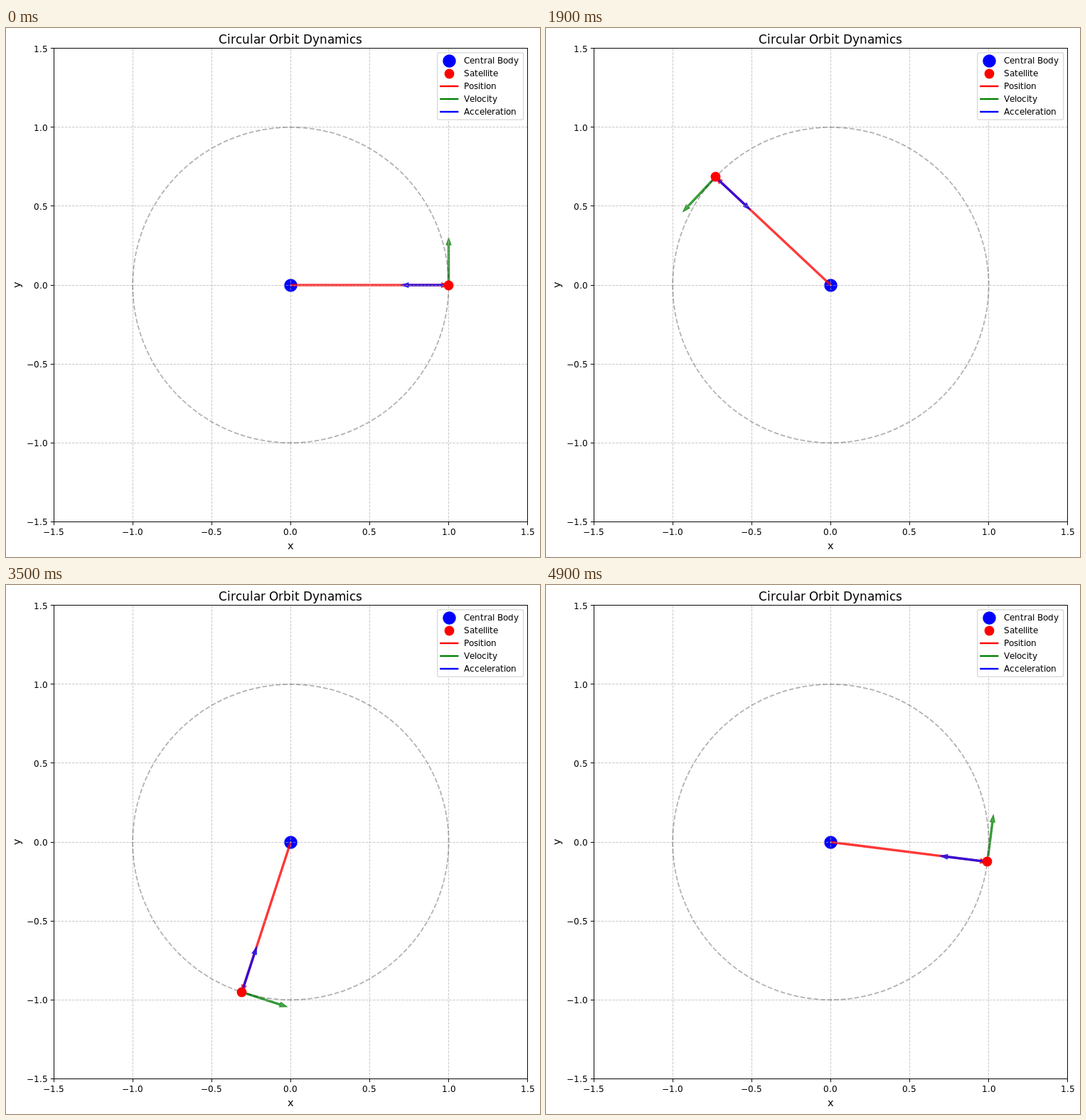
Write an HTML page with a canvas that moves like this. It is 751 px wide and 745 px high and loops after 5 s.

```html
<!DOCTYPE html>
<html lang="en">
<head>
<meta charset="utf-8">
<title>Circular Orbit Dynamics</title>
<style>
html, body { margin: 0; width: 100%; height: 100%; overflow: hidden; background: #fff; }
canvas { display: block; }
</style>
</head>
<body>
<canvas id="plot" width="751" height="745"></canvas>
<script>
const ctx = document.getElementById('plot').getContext('2d');
const PT = 1.2024;              // pixels per point
const CX = 400.35, CY = 362.05; // plot centre
const UNIT = 222.2;             // pixels per data unit
const STEPS = 50, STEP_MS = 100;
const TICKS = [-1.5, -1, -0.5, 0, 0.5, 1, 1.5];

const px = x => CX + x * UNIT;
const py = y => CY - y * UNIT;
const snap = v => Math.floor(v) + 0.5;
const L = snap(px(-1.5)), R = snap(px(1.5));
const T = snap(py(1.5)), B = snap(py(-1.5));

function line(x1, y1, x2, y2) {
  ctx.beginPath();
  ctx.moveTo(x1, y1);
  ctx.lineTo(x2, y2);
  ctx.stroke();
}

function pen(color, points, dashed = false) {
  const w = points * PT;
  ctx.strokeStyle = color;
  ctx.lineWidth = w;
  ctx.setLineDash(dashed ? [3.7 * w, 1.6 * w] : []);
}

// Markers sit on pixel centres
function dot(x, y, r, color) {
  ctx.fillStyle = color;
  ctx.beginPath();
  ctx.arc(snap(x), snap(y), r, 0, 2 * Math.PI);
  ctx.fill();
}

// Text on whole pixels, each glyph advancing by its rounded width.
// anchor: 0 left, 0.5 centre, 1 right
function text(str, x, y, points = 10, anchor = 0.5) {
  ctx.font = `${points * PT}px "DejaVu Sans", sans-serif`;
  ctx.fillStyle = '#000';
  const widths = [...str].map(ch => Math.round(ctx.measureText(ch).width));
  const total = widths.reduce((sum, w) => sum + w, 0);
  let left = Math.round(x - total * anchor);
  [...str].forEach((ch, i) => {
    ctx.fillText(ch, left, Math.round(y));
    left += widths[i];
  });
}

// Arrow from (x, y) along (dx, dy) in data units, head included in its length
function arrow(x, y, dx, dy, color) {
  const len = Math.hypot(dx, dy) * UNIT;
  const half = 0.005 * UNIT, wide = 0.015 * UNIT, neck = len - 0.045 * UNIT;
  ctx.save();
  ctx.translate(px(x), py(y));
  ctx.rotate(Math.atan2(-dy, dx));
  ctx.globalAlpha = 0.7;
  ctx.fillStyle = color;
  pen(color, 1);
  ctx.beginPath();
  ctx.moveTo(0, -half);
  ctx.lineTo(neck, -half);
  ctx.lineTo(neck, -wide);
  ctx.lineTo(len, 0);
  ctx.lineTo(neck, wide);
  ctx.lineTo(neck, half);
  ctx.lineTo(0, half);
  ctx.closePath();
  ctx.fill();
  ctx.stroke();
  ctx.restore();
}

function drawGrid() {
  pen('rgba(176,176,176,0.7)', 0.8, true);
  for (const v of TICKS.slice(1, -1)) {
    line(snap(px(v)), B, snap(px(v)), T);
    line(L, snap(py(v)), R, snap(py(v)));
  }
}

function drawOrbit() {
  pen('rgba(0,0,0,0.3)', 1.5, true);
  ctx.beginPath();
  ctx.arc(CX, CY, UNIT, 0, -2 * Math.PI, true);
  ctx.stroke();
}

function drawAxes() {
  pen('#000', 0.8);
  ctx.strokeRect(L, T, R - L, B - T);
  for (const v of TICKS) {
    const label = v.toFixed(1).replace('-', '\u2212');
    const x = snap(px(v)), y = snap(py(v));
    line(x, B, x, B + 4.7);
    line(L, y, L - 4.7, y);
    text(label, px(v), 714);
    text(label, 58.6, py(v) + 4.9, 10, 1);
  }
  text('Circular Orbit Dynamics', CX, 22, 14);
  text('x', CX, 734, 12);
  ctx.save();
  ctx.translate(20, Math.round(CY));
  ctx.rotate(-Math.PI / 2);
  text('y', 0, 0, 12);
  ctx.restore();
}

function drawLegend() {
  ctx.fillStyle = 'rgba(255,255,255,0.8)';
  pen('rgba(204,204,204,0.8)', 1);
  ctx.beginPath();
  ctx.roundRect(606.7, 34.8, 121, 94.4, 2.4);
  ctx.fill();
  ctx.stroke();
  dot(623, 46, 9.3, '#00f');
  dot(623, 64, 6.9, '#f00');
  ['#f00', '#008000', '#00f'].forEach((color, i) => {
    const y = 82 + i * 18;
    pen(color, 2);
    line(610.2, y, 636.4, y);
  });
  ['Central Body', 'Satellite', 'Position', 'Velocity', 'Acceleration']
    .forEach((name, i) => text(name, 644, 50 + i * 18, 10, 0));
}

function draw(now) {
  const a = 2 * Math.PI * (Math.floor(now / STEP_MS) % STEPS) / STEPS;
  const x = Math.cos(a), y = Math.sin(a);
  ctx.fillStyle = '#fff';
  ctx.fillRect(0, 0, 751, 745);
  dot(CX, CY, 9.3, '#00f');
  arrow(0, 0, x, y, '#f00');
  arrow(x, y, -0.3 * y, 0.3 * x, '#008000');
  arrow(x, y, -0.3 * x, -0.3 * y, '#00f');
  drawGrid();
  drawOrbit();
  drawAxes();
  dot(px(x), py(y), 6.9, '#f00');
  drawLegend();
}

function loop() {
  draw(performance.now());
  requestAnimationFrame(loop);
}
loop();
</script>
</body>
</html>
```
